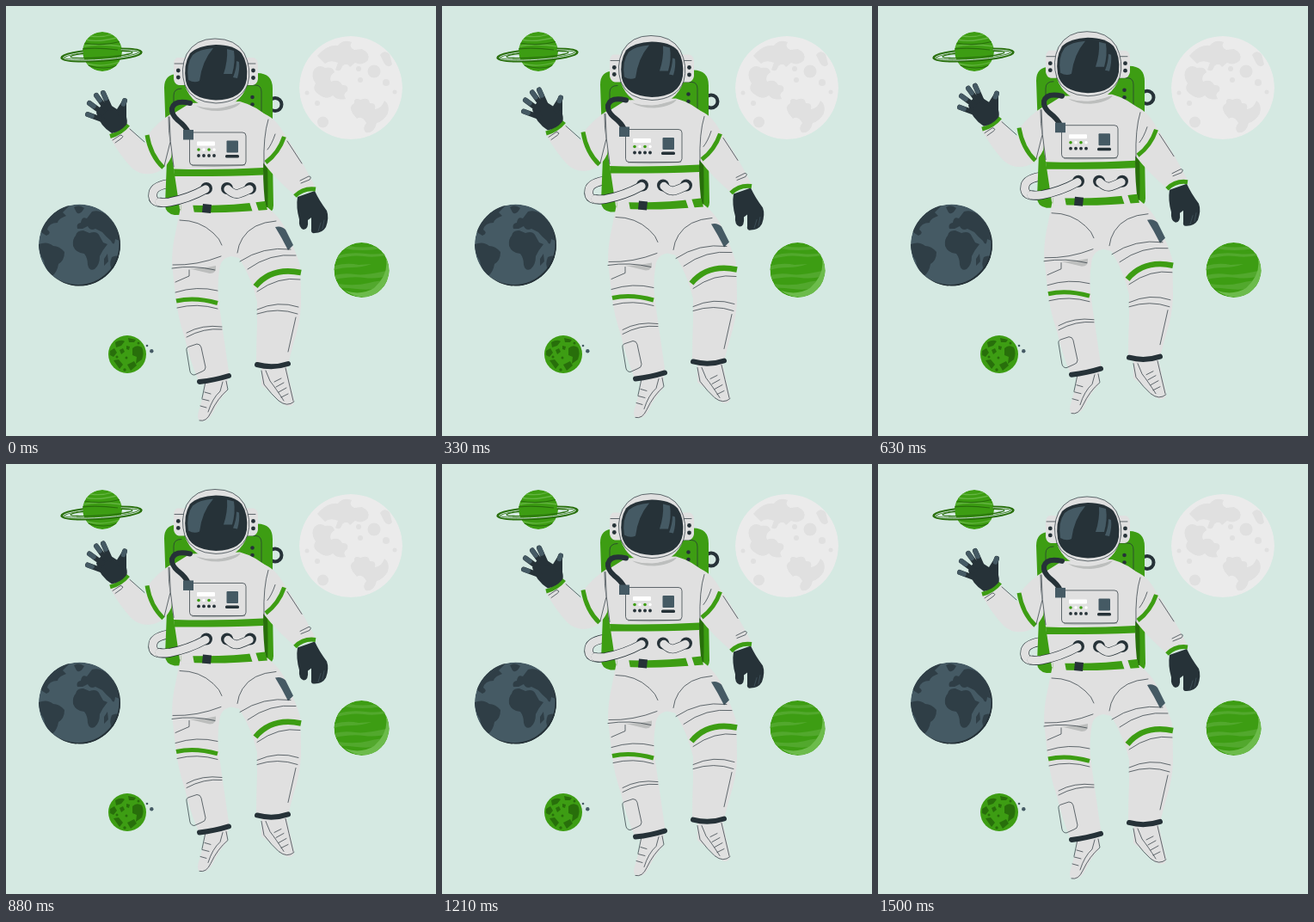
Write an HTML page that moves like this. It is 500x500 px and loops after 1540 ms.

```html
<!DOCTYPE html>
<html lang="en">
<head>
<meta charset="utf-8">
<title>Floating astronaut</title>
<style>
html, body { margin: 0; width: 100%; height: 100%; overflow: hidden; background: #d5e9e2; }
svg { display: block; width: 100%; height: 100%; }
.suit { fill: #e0e0e0; }
.green { fill: #3d9d13; }
.dark { fill: #263238; }
.slate { fill: #455a64; }
.shade { fill: #bcbebd; }
.line, .band, .cuff { fill: none; stroke: #263238; }
.line { stroke-width: .7; stroke-linecap: round; stroke-linejoin: round; }
.band { stroke: #3d9d13; stroke-width: 5; }
.cuff { stroke-width: 6; stroke-linecap: round; }
.finger { fill: none; stroke: #263238; stroke-width: 6; stroke-linecap: round; }
.tip { stroke: #455a64; stroke-width: 5.5; }
</style>
</head>
<body>
<svg viewBox="0 0 500 500">
<defs>
  <clipPath id="moonDisc"><circle cx="401" cy="95" r="60"/></clipPath>
  <clipPath id="earthDisc"><circle cx="85.5" cy="278" r="47.5"/></clipPath>
  <clipPath id="gasDisc"><circle cx="413.5" cy="307" r="32"/></clipPath>
  <clipPath id="ringedDisc"><circle cx="112" cy="53" r="23"/></clipPath>
  <clipPath id="visibleRing"><path d="M50 57H171V80H50ZM50 40H90V57H50ZM134 40H171V57H134Z"/></clipPath>
</defs>

<g id="moon" clip-path="url(#moonDisc)" fill="#e0e0e0">
  <circle cx="401" cy="95" r="60" fill="#ebebeb"/>
  <path d="M362 58Q374 44 386 46Q392 38 402 42Q398 48 405 51L414 50Q424 55 421 63Q414 70 406 66L400 71Q396 65 391 70Q389 78 383 74L386 66Q377 62 371 67Z"/>
  <path d="M358 74Q364 67 371 72Q380 70 382 77Q375 82 378 88Q387 84 391 92Q399 91 397 99Q391 102 395 108Q385 110 380 104Q373 110 364 103Q355 98 360 90Q354 82 358 74Z"/>
  <path d="M403 125Q398 116 405 113Q404 106 412 109Q422 105 423 113Q431 112 429 120Q437 119 440 110Q447 115 444 125Q439 134 431 136Q428 149 418 147Q414 142 419 136Q414 127 408 131Z"/>
  <path d="M435 57Q440 50 446 56L449 68Q444 73 440 67Z"/>
  <circle cx="428" cy="76" r="7.5"/><circle cx="368.5" cy="135" r="6.5"/>
  <circle cx="412" cy="86" r="3"/><circle cx="442" cy="89" r="4"/>
  <circle cx="362" cy="113" r="3"/><circle cx="410" cy="73" r="3"/>
  <circle cx="452" cy="100" r="2.5"/><circle cx="350" cy="101" r="2.5"/>
</g>

<g id="earth" clip-path="url(#earthDisc)" fill="#2f3e46">
  <circle class="slate" cx="85.5" cy="278" r="47.5"/>
  <path d="M39 262Q43 246 55 237Q65 231 74 232L66 240L70 244Q61 247 60 252Q50 252 48 260Q54 264 47 267Z"/>
  <path d="M38 277Q48 273 55 279Q62 279 68 286Q68 296 61 300Q60 308 54 314Q45 307 44 296Q38 288 38 277Z"/>
  <path d="M81 267Q82 261 90 261L97 264Q105 261 108 266L113 275L118 277Q112 284 109 291Q109 301 103 306Q97 309 95 301Q95 293 91 288Q81 287 78 279Q77 271 81 267Z"/>
  <path d="M83 259Q81 253 87 252Q88 244 94 247L100 239Q111 236 120 246Q130 257 132 273L127 271Q126 281 122 273Q116 268 112 263L104 259Q98 262 95 256L89 259Z"/>
  <path d="M79 234Q85 230 91 235Q86 244 82 240ZM114 294L118 288L119 297L114 302ZM123 292Q129 289 131 292L124 307Q119 302 123 292Z"/>
  <path class="dark" d="M113 238A49 49 0 0 1 75 325Q96 328 114 316L133 300V255Z" clip-path="none" fill-opacity="0"/>
  <path d="M112 237A47.5 47.500 0 0 1 70 322A49 49 0 0 0 112 237Z" fill="none"/>
  <circle cx="84" cy="276.500" r="48.500" fill="none" stroke="#263238" stroke-width="2"/>
</g>

<g id="gas" clip-path="url(#gasDisc)" fill="#52a82d">
  <circle class="green" cx="413.5" cy="307" r="32"/>
  <path d="M386 290Q400 286 418 288T446 285V289Q430 293 416 291T385 294ZM382 302Q397 298 410 301L425 300Q414 304 402 304T381 307ZM382 313Q394 310 406 312T446 307V313Q432 318 417 316T382 318ZM386 323Q406 326 422 322T444 320L440 327Q424 331 408 329T388 328ZM399 279Q414 282 432 279L437 282Q414 286 393 282Z"/>
  <path d="M441 290Q447 311 428 328Q413 337 394 331Q414 345 436 334Q453 315 441 290Z" fill="#6cbb4b"/>
</g>

<g id="ringed">
  <g clip-path="url(#ringedDisc)" fill="none">
    <circle class="green" cx="112" cy="53" r="23"/>
    <path d="M92 39Q107 43 132 36M89 47Q107 43 135 47M94 67Q112 72 132 65M98 35Q112 37 123 33" stroke="#64b441" stroke-width="1.3"/>
    <path d="M91 43Q112 47 134 41M94 69Q115 75 130 69M88 50Q106 48 130 51" stroke="#286f0b" stroke-width="1.2"/>
  </g>
  <g transform="rotate(-4 111 57)" fill="none" stroke="#286f0b" clip-path="url(#visibleRing)">
    <ellipse cx="111" cy="57" rx="46" ry="6" stroke-width="3.600"/>
    <ellipse cx="111" cy="57" rx="44.500" ry="5.300" stroke="#d5e9e2" stroke-width=".9"/>
    <ellipse cx="111" cy="56.500" rx="36" ry="3.200" stroke-width="1.200"/>
  </g>
</g>

<g id="cratered" fill="#286f0b">
  <circle class="green" cx="141" cy="405" r="22"/>
  <path d="M147 398Q152 393 158 397Q161 403 158 411L151 416L152 408L147 406ZM127 391Q134 387 138 390L134 395L128 397ZM121 401L126 398L129 403L125 408L121 406ZM125 412L131 411L136 417L132 422ZM141 417L149 413L152 418L145 424ZM142 386L151 388L149 391L143 391Z"/>
  <path d="M132 400L136 398L138 402L134 405ZM140 395L144 396L143 400L140 399Z"/>
  <circle cx="140" cy="409" r="1.5"/><circle cx="129" cy="408" r="1.5"/><circle cx="138" cy="423" r="1.7"/><circle cx="154" cy="392" r="1.5"/>
  <g class="slate"><circle cx="164" cy="395" r="1.3"/><circle cx="169.3" cy="401.3" r="2.2"/></g>
</g>

<g id="astronaut">
  <path id="returnHose" d="M190 228Q168 232 171 217Q173 208 194 206" fill="none" stroke="#263238" stroke-width="10.600"/>
  <path d="M190 228Q168 232 171 217Q173 208 194 206" fill="none" stroke="#e0e0e0" stroke-width="9.300"/>

  <g id="backpack">
    <circle class="line" cx="313" cy="114.5" r="7.5" style="stroke-width:4"/>
    <path class="green" d="M184 95Q184 79 200 79L292 78Q310 78 310 96V180L311 232Q311 241 302 241L196 243Q185 241 185 231L187 180Z"/>
    <path d="M299 178L304 182Q305 216 304 241H299Z" fill="#286f0b"/>
    <path class="line" d="M195 128V104Q195 96 204 96M278 92H290Q297 92 297 100V126"/>
    <circle class="dark" cx="286.5" cy="106" r="2.3"/><circle class="dark" cx="286.5" cy="114.5" r="2.3"/>
  </g>

  <g id="wavingArm">
    <path class="suit" d="M194 124Q176 135 165 150L162 161L143 141L121 153Q132 173 146 188Q156 197 169 195Q184 193 192 176Z"/>
    <path class="band" d="M164 150Q168 174 183 188"/>
    <path class="line" d="M144 143L161 158M124 156L133 150Q138 151 134 154L127 159M189 129Q189 146 191 158L184 186"/>
    <path class="band" d="M121 151.5Q134 148 142 138"/>
    <path class="dark" d="M105 124Q109 114 118 113L129 120L134 112Q137 107 140 111L140 129Q142 137 139 139Q133 146 123 148Q109 139 105 124Z"/>
    <path class="finger" d="M114 133L95 126M112 124L97 113M116 119L105 104M121 119L113 101M133 125L138 110"/>
    <path class="finger tip" d="M100 128L95 126M102 116.500L97 113M109 109.500L105 104M116 107.500L113 101M136.500 114L138 110"/>
  </g>

  <g id="restingArm">
    <path class="suit" d="M297 124Q313 129 323 148Q344 179 360 211L337 221Q316 204 298 181Z"/>
    <path class="band" d="M323.5 152Q317 171 302 182"/>
    <path class="line" d="M313 149Q309 161 304 167M342 203L352 198Q356 198 353 202L343 206M327 157L344 183"/>
    <path class="dark" d="M339 222L359 215Q364 226 373 238Q376 246 372 257Q368 264 359 264Q354 265 355 259L355 246L351 249Q352 260 346 260Q340 258 341 248Q337 234 339 222Z"/>
    <path class="line" d="M363 262L366 252M368 259L370 249" style="stroke:#455a64"/>
    <path class="band" d="M336 221Q346 211 360 213"/>
  </g>

  <g id="feet">
    <path class="suit" d="M231 437L258 433L257 448Q248 457 240 474Q234 485 225 482Q221 479 225 468L230 450Z"/>
    <path class="suit" d="M297 420L326 418L330 437L335 458Q335 467 327 465Q318 462 309 450L297 441Z"/>
    <path class="line" d="M256 436L258 446Q246 456 238 473Q233 484 225 482M231 449L238 451M228 457L236 459M226 465L233 467M232 437L228 456M252 437L249 448Q240 456 235 472"/>
    <path class="line" d="M297 424L300 440Q309 452 317 459Q327 467 335 460M325 421L329 438L334 459M312 437L320 433M314 443L323 438M317 449L326 444M320 455L328 451M302 424L307 436Q314 445 323 459"/>
  </g>

  <g id="legs">
    <path class="suit" d="M203 234H304Q323 249 329 270Q337 285 342 302Q343 324 343 347Q342 369 335 390L328 416L291 416Q291 393 292 369L292 344Q286 317 271 293L262 291Q249 293 248 308Q245 326 248 349L260 432L224 436Q213 410 208 386Q200 364 197 337L193 300Q193 281 197 264Z"/>
    <path class="shade" d="M212 305Q228 306 244 302Q245 311 237 311Q224 308 212 305Z"/>
    <path class="slate" d="M313 257Q320 255 325 260L334 278L328 284Q321 270 313 257Z"/>
    <path class="line" d="M202 249Q225 249 241 264Q249 271 251 278M314 250Q286 252 275 270Q270 278 269 287M194 301Q222 302 250 291M193 305Q218 301 243 307M197 321L213 314V307M197 333Q222 325 246 331M199 351Q222 345 246 352M210 380Q228 370 251 373M210 385Q230 374 251 376"/>
    <path class="line" d="M272 297Q299 279 331 283M281 306Q307 287 337 290M292 332Q317 314 342 318M292 353Q316 342 340 350M292 358Q316 350 339 358M337 362L328 402"/>
    <path class="line" d="M210 401Q209 397 213 396L222 393Q226 393 227 397L232 420Q232 424 228 425L219 429Q215 429 214 425Z"/>
    <path class="band" d="M198 343Q220 338 246 345.5"/>
    <path class="band" d="M290 326Q309 303 343 310" style="stroke-width:6.5"/>
    <path class="cuff" d="M225 437Q243 435 259 430M292 417Q310 422 328 416"/>
  </g>

  <g id="torso">
    <path class="suit" d="M214 113Q203 120 190 128Q189 157 195 189L202 236H302Q299 212 299 190Q300 156 307 131Q291 116 272 111Z"/>
    <path class="shade" d="M221 116Q244 123 273 112Q268 120 247 122Q230 122 221 116Z"/>
    <path class="line" d="M190 129Q190 157 195 187M305 132Q299 151 300 185"/>
    <path class="green" d="M195 189.5Q248 191 299 188V196.500Q250 198.500 196 198ZM203 231Q248 234 301 227L304 237Q249 242 204 239Z"/>
    <path class="suit" d="M203 229L217 230 219 241 204 241ZM283 228L290 227 294 239 287 240Z"/>
    <path class="dark" d="M229 230L239 231 238 241 228 240Z"/>
    <path d="M216 185.500Q245 187 278 185" fill="none" stroke="#aaafae" stroke-width="1.5"/>
    <rect class="line" x="213.500" y="147" width="65.500" height="38" rx="4"/>
    <rect x="222" y="157.5" width="21" height="5" rx="1" fill="#fff"/>
    <g class="green"><circle cx="224" cy="167" r="1.8"/><circle cx="236" cy="167" r="1.8"/></g>
    <g fill="#fff"><circle cx="230" cy="167" r="1.8"/><circle cx="242" cy="167" r="1.8"/></g>
    <g class="dark"><circle cx="224" cy="174" r="1.9"/><circle cx="230" cy="174" r="1.9"/><circle cx="236" cy="174" r="1.9"/><circle cx="242" cy="174" r="1.9"/></g>
    <rect class="slate" x="256.5" y="156.5" width="13.5" height="14" rx="1"/>
    <rect class="dark" x="255" y="173" width="16" height="3.5" rx="1.5"/>
  </g>

  <g id="hoses" fill="none" stroke-linecap="round">
    <circle class="dark" cx="233" cy="212" r="7"/><circle class="dark" cx="257" cy="212" r="7"/><circle class="dark" cx="284" cy="212" r="7"/>
    <g stroke="#263238" stroke-width="10.600">
      <path d="M232 213Q212 224 190 228Q183 229 179 228"/>
      <path d="M258 213Q265 220 271 218T283 213"/>
    </g>
    <g stroke="#e0e0e0" stroke-width="9.300">
      <path d="M232 213Q212 224 190 228Q183 229 178 228"/>
      <path d="M258 213Q265 220 271 218T283 213"/>
    </g>
    <path d="M214 113Q196 109 193 119Q192 126 200 133Q209 140 212 147" stroke="#263238" stroke-width="6"/>
    <rect class="slate" x="206" y="144" width="12" height="11.5"/>
  </g>

  <g id="helmet">
    <path class="suit" d="M208 60H199Q195 62 195 68V85Q196 91 201 92H210ZM279 60H288Q293 62 293 68V85Q292 91 287 92H278Z"/>
    <path class="line" d="M196 67H206M281 67H290"/>
    <g class="dark"><circle cx="200.3" cy="75" r="2.4"/><circle cx="200.3" cy="83" r="2.4"/><circle cx="287.5" cy="75" r="2.4"/><circle cx="287.5" cy="83.5" r="2.4"/></g>
    <path class="suit" d="M243 38Q267 38 277 55Q286 73 281 91Q272 117 244 119Q216 117 208 92Q202 73 210 56Q220 38 243 38Z"/>
    <path class="line" d="M208 92Q202 73 210 56Q220 38 243 38Q267 38 277 55Q286 73 281 91Q273 112 244 113Q216 112 208 92"/>
    <path class="dark" d="M244 45Q265 45 274 55Q282 67 280 85Q276 109 244 109.500Q213 108 209 87Q206 68 214 55Q223 46 244 45Z"/>
    <path class="slate" d="M212 86Q209 68 217 57Q225 50 241 49Q228 64 225 87Q219 90 212 86ZM257 50L265 52Q267 65 263 79L253 79Q258 64 257 50ZM268 64L271 65Q272 74 269 84L264 83Q268 73 268 64Z"/>
  </g>
</g>
</svg>
<script>
const astronaut = document.getElementById("astronaut");
const period = 1540, lift = 9;

function draw() {
  const phase = performance.now() % period / period;
  const y = -lift * (1 - Math.cos(2 * Math.PI * phase)) / 2;
  astronaut.setAttribute("transform", `translate(0 ${y.toFixed(3)})`);
  requestAnimationFrame(draw);
}
draw();
</script>
</body>
</html>
```
